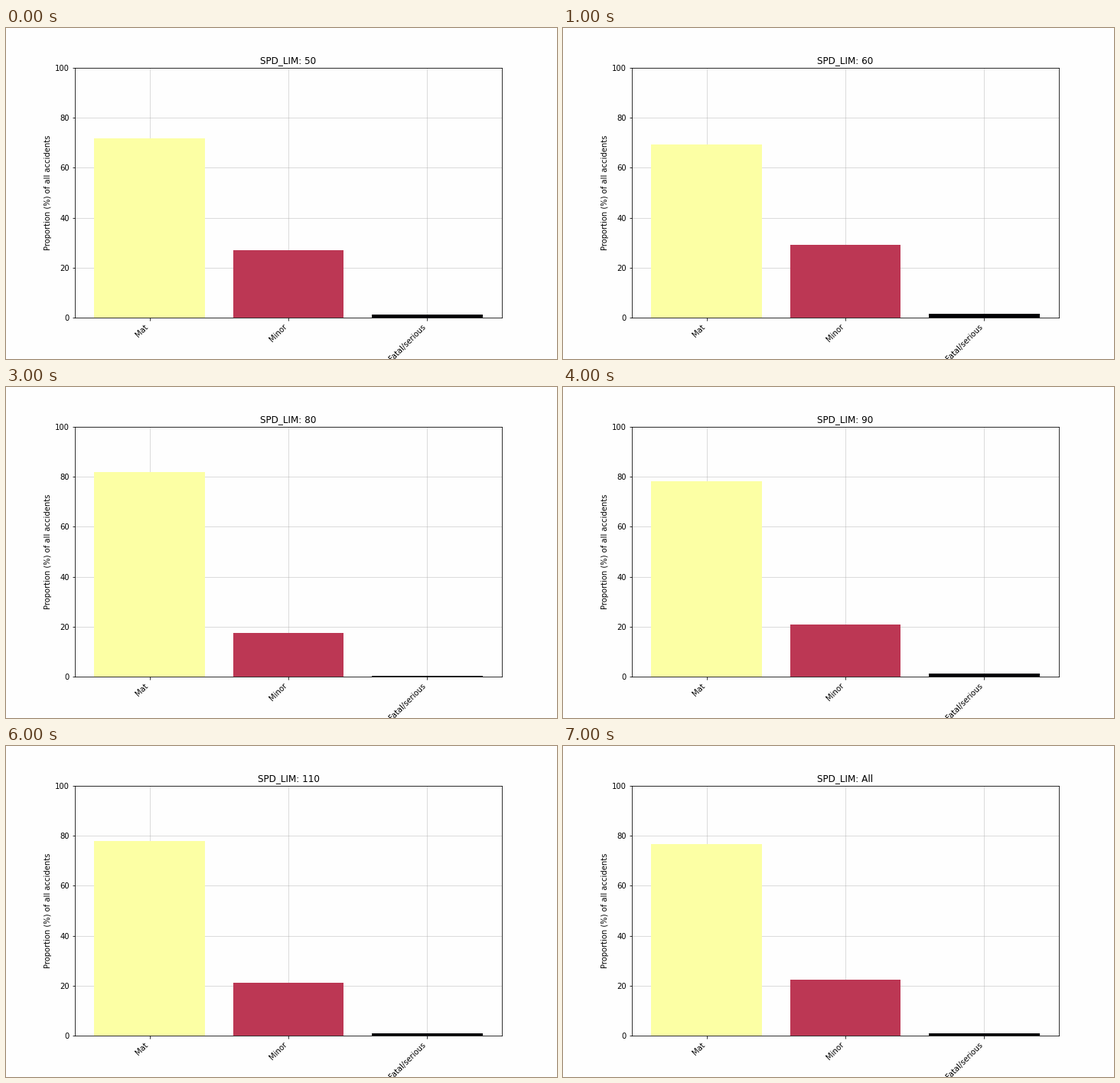
Recreate the animation shown at these times as a matplotlib script. Size 720x432 px, loop 8 s.

```python
import matplotlib.pyplot as plt
from matplotlib.animation import FuncAnimation

plt.rcParams["font.family"] = "DejaVu Sans"
plt.rcParams["font.size"] = 10

LABELS = ["Mat", "Minor", "Fatal/serious"]
COLORS = ["#fcffa4", "#bc3754", "#000004"]
PAPER = "#fefefe"

# speed limit -> share of accidents (%) per severity
SHARES = [
    ("50", (71.75, 27.0, 1.25)),
    ("60", (69.3, 29.15, 1.55)),
    ("70", (86.1, 13.4, 0.55)),
    ("80", (81.9, 17.5, 0.35)),
    ("90", (78.1, 20.7, 1.2)),
    ("100", (84.0, 15.3, 0.9)),
    ("110", (77.9, 21.2, 0.9)),
    ("All", (76.65, 22.4, 0.9)),
]

fig, ax = plt.subplots(figsize=(10, 6), dpi=72, facecolor=PAPER)
fig.subplots_adjust(left=0.125, right=0.9, bottom=0.125, top=0.88)
ax.set_facecolor(PAPER)
ax.set_axisbelow(True)
ax.grid(color="#b0b0b0", linewidth=0.8, alpha=0.55)

bars = ax.bar(range(3), SHARES[0][1], width=0.8, color=COLORS)
ax.set_xlim(-0.54, 2.54)
ax.set_ylim(0, 100)
ax.set_xticks(range(3), LABELS, rotation=45, ha="right")
ax.set_ylabel("Proportion (%) of all accidents")
title = ax.set_title("", fontsize=12)


def update(i):
    limit, shares = SHARES[i]
    title.set_text(f"SPD_LIM: {limit}")
    for bar, share in zip(bars, shares):
        bar.set_height(share)
    return [title, *bars]


anim = FuncAnimation(fig, update, frames=len(SHARES), interval=1000,
                     repeat=True, repeat_delay=0, blit=False)
plt.show()
```
